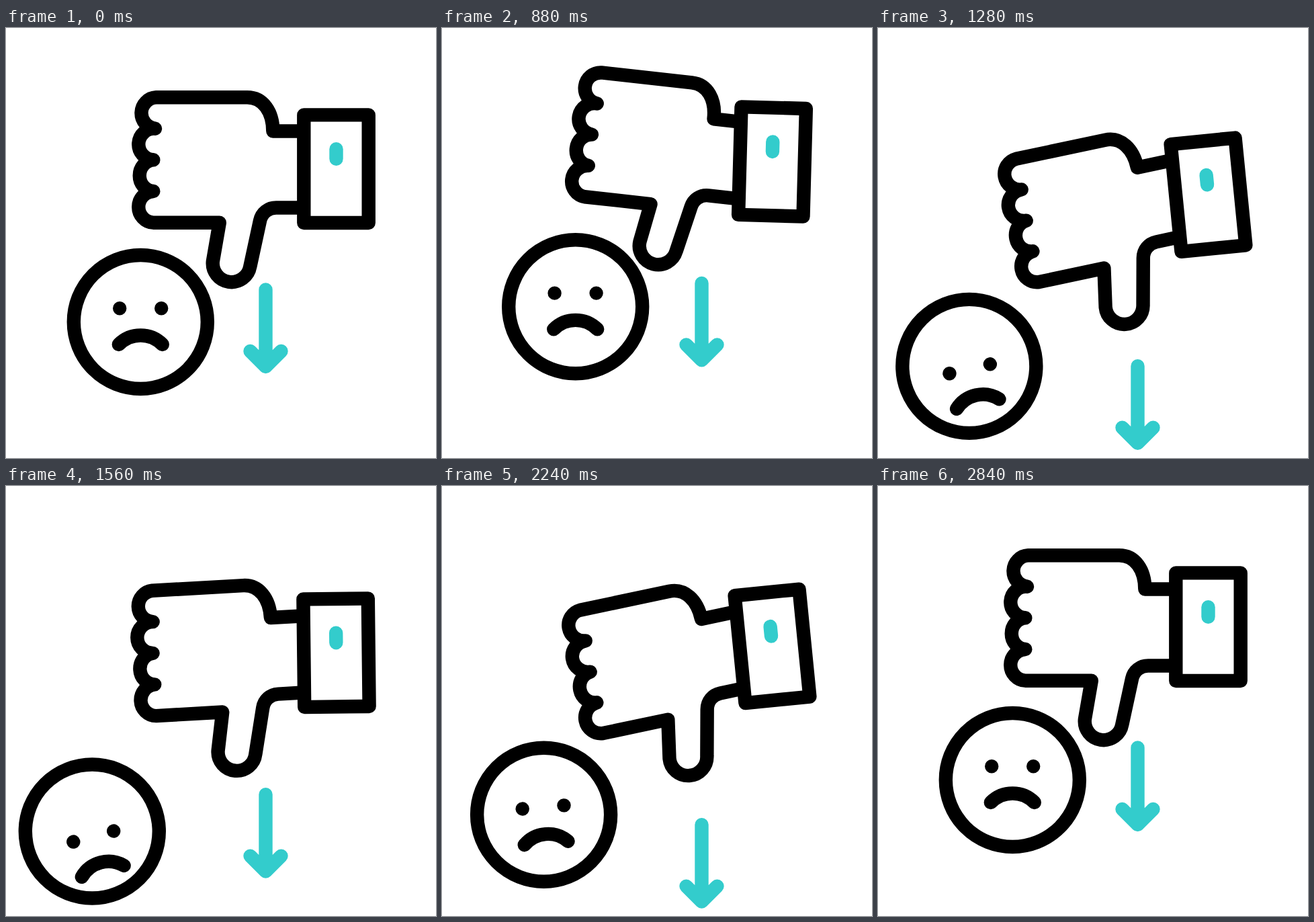
An HTML page that plays this animation: 640x640 px, repeating every 3000 ms.

```html
<!DOCTYPE html>
<html lang="en">
<head>
<meta charset="utf-8">
<title>Thumbs down</title>
<style>
  html, body { margin: 0; height: 100%; overflow: hidden; background: #fff; }
  svg { display: block; width: 100vw; height: 100vh; }
  g { fill: none; stroke: #000; stroke-width: 20.4; stroke-linejoin: round; }
  .round { stroke-linecap: round; }
  .teal { stroke: #3cc; stroke-linecap: round; }
</style>
</head>
<body>
<svg viewBox="0 0 640 640">
  <g id="face">
    <circle cx="200.3" cy="437.5" r="99.5"/>
    <path id="features" class="round" d="M169.2 417.3h.01m62 0h.01M167.8 471a46 46 0 0 1 65 0"/>
  </g>
  <g id="hand">
    <path d="M443 153.5H397.3C397.3 125 383 103.3 359 103.3H223.5
      a23.3 23.3 0 0 0-1.5 46.4a23.3 23.3 0 0 0-2.7 46.6
      a22 23.4 0 0 0 0 46.7a23.4 23.4 0 0 0-.3 46.7
      H317.8L307.9 347A28 28 0 0 0 363.3 355L378 287
      C380.5 275 390.5 267.5 402 267.5H443"/>
  </g>
  <g id="cuff">
    <rect x="443.3" y="129.4" width="96.4" height="160.6"/>
    <path class="teal" d="M491.5 180.2v14.5"/>
  </g>
  <g id="arrow">
    <path class="teal" d="M386.5 389.5V503m-23-22l23 23l23-23"/>
  </g>
</svg>
<script>
const LOOP = 3000, STEP = 40;

function place(id, transform) {
  document.getElementById(id).setAttribute('transform', transform);
}

function draw() {
  const t = Math.floor(performance.now() % LOOP / STEP) * STEP;

  // Eased progress from 0 to 1 between two times in ms.
  const ease = (start, end) => {
    const u = Math.min(1, Math.max(0, (t - start) / (end - start)));
    return u * u * (3 - 2 * u);
  };

  // Hand and cuff wind up together, strike, then strike again.
  const windUp = ease(200, 690);
  const secondStrike = ease(1700, 2220) - ease(2220, 2650);
  const handY = -41.5 * windUp + 80 * ease(690, 1140) - 38.5 * ease(2085, 2555);
  const handTurn = 12 * (windUp - 2 * ease(690, 1290) + ease(1290, 1700) - secondStrike);
  const cuffTurn = 7.2 * windUp - 12.9 * ease(690, 1105) + 5.7 * (ease(1260, 1640) - secondStrike);
  place('hand', `translate(0 ${handY}) rotate(${handTurn} 467 215.5)`);
  place('cuff', `translate(0 ${handY}) rotate(${cuffTurn} 491.5 209.7)`);

  const rebound = ease(1310, 1665) - ease(1665, 2270);
  const arrowY = -23.5 * ease(200, 775) + 138.5 * ease(775, 1310) - 57.5 * rebound - 115 * ease(2270, 2840);
  place('arrow', `translate(0 ${arrowY})`);

  // The face hops, gets knocked aside and rolls back; its features slide down as it tilts.
  const back = ease(1970, 2680);
  const knock = ease(830, 1393) - back;
  const tilt = ease(865, 1405) - ease(1925, 2430);
  place('face', `translate(${-72 * knock} ${101.5 * knock - 25 * (ease(200, 800) - back)})`);
  place('features', `rotate(${-15 * tilt} 200.3 437.5) translate(0 ${28 * tilt})`);

  requestAnimationFrame(draw);
}
draw();
</script>
</body>
</html>
```
